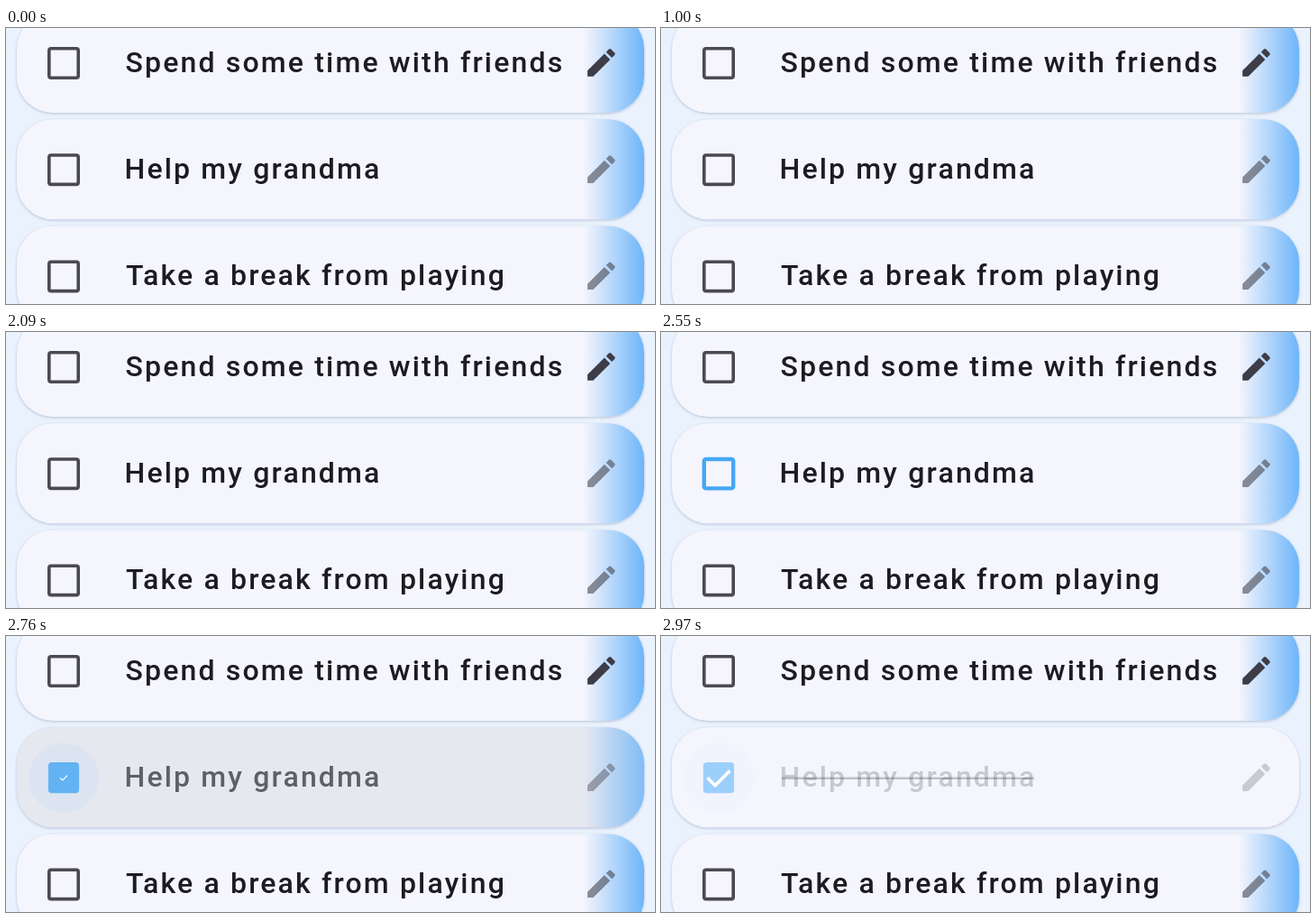
An HTML page that plays this animation: 720x306 px, repeating every 3090 ms.

```html
<!DOCTYPE html>
<html lang="en">
<head>
<meta charset="utf-8">
<title>Task list</title>
<style>
  html, body { margin: 0; width: 100%; height: 100%; overflow: hidden; background: #eaf2fd; }
  svg { display: block; width: 720px; height: 306px; }
  text { font: 500 32px Roboto, Inter, sans-serif; letter-spacing: 2.15px; fill: #1b1b21; }

  .row {
    --card: #f5f5fd; --ink: 1; --pen: .56; --glow: 1; --strike: 0;
    --line: #4a4951; --weight: 3.6; --size: 1;
    --fill: none; --tick: 0; --ripple: 0;
  }
  .strong { --pen: 1; }
  .card { fill: var(--card); filter: drop-shadow(0 1px 1.5px rgba(70, 95, 140, .32)); }
  .glow { fill: url(#blue); opacity: var(--glow); }
  .ink { opacity: var(--ink); }
  .pen { fill: #3c3d47; opacity: var(--pen); }
  .strike { stroke: #1b1b21; stroke-width: 2.6; opacity: var(--strike); }
  .ripple { fill: #42a5f5; opacity: var(--ripple); }
  .box {
    fill: var(--fill); stroke: var(--line); stroke-width: var(--weight);
    transform: scale(var(--size));
  }
  .tick { fill: none; stroke: #fff; stroke-width: 3.7; transform: scale(var(--tick)); }

  /* outline turns blue, fills with a ripple, then the row fades out */
  .done { animation: complete 3090ms step-end infinite; }
  @keyframes complete {
    82.524% { --line: #45a7f5; --weight: 4.4; }
    86.408% { --line: #42a5f5; --fill: #42a5f5; --size: .9; --ripple: .12; }
    89.320% {
      --line: #63b3f2; --fill: #63b3f2; --size: .93; --tick: .32; --ripple: .06;
      --card: #e6e8f0; --ink: .66; --pen: .42; --glow: .85;
    }
    93.204% {
      --line: #8bc7f8; --fill: #8bc7f8; --tick: .9; --ripple: .02;
      --card: #f0f1f9; --ink: .36; --pen: .3; --glow: .25; --strike: .2;
    }
    96.117%, 100% {
      --line: #9dcffb; --fill: #9dcffb; --tick: 1;
      --card: #f5f5fd; --ink: .2; --pen: .23; --glow: 0; --strike: .24;
    }
  }
</style>
</head>
<body>
<svg viewBox="0 0 720 306">
  <defs>
    <linearGradient id="blue" gradientUnits="userSpaceOnUse" x1="641" x2="708" y1="0" y2="0">
      <stop offset="0" stop-color="#6db5f9" stop-opacity="0"/>
      <stop offset=".25" stop-color="#6db5f9" stop-opacity=".24"/>
      <stop offset="1" stop-color="#6db5f9"/>
    </linearGradient>
    <rect id="panel" x="12" y="-17" width="696" height="111" rx="40"/>
    <path id="pencil" transform="translate(640 18) scale(1.7)" d="M3 17.25V21h3.75L17.81 9.94l-3.75-3.75zM20.71 7.04a1 1 0 0 0 0-1.41l-2.34-2.34a1 1 0 0 0-1.41 0l-1.83 1.83 3.75 3.75z"/>
    <rect id="square" x="-16.2" y="-16.2" width="32.4" height="32.4" rx="2.2"/>
  </defs>

  <g class="row strong">
    <use class="card" href="#panel"/>
    <use class="glow" href="#panel"/>
    <g transform="translate(64 39)"><use class="box" href="#square"/></g>
    <text x="132.5" y="49">Spend some time with friends</text>
    <use class="pen" href="#pencil"/>
  </g>

  <g class="row done" transform="translate(0 118.2)">
    <use class="card" href="#panel"/>
    <use class="glow" href="#panel"/>
    <g transform="translate(64 39)">
      <circle class="ripple" r="39"/>
      <use class="box" href="#square"/>
      <path class="tick" d="M-12.5 0L-4 8.5L12.5-8"/>
    </g>
    <text class="ink" x="131.5" y="49">Help my grandma</text>
    <path class="strike" d="M134 39.5H414"/>
    <use class="pen" href="#pencil"/>
  </g>

  <g class="row" transform="translate(0 236.4)">
    <use class="card" href="#panel"/>
    <use class="glow" href="#panel"/>
    <g transform="translate(64 39)"><use class="box" href="#square"/></g>
    <text x="133" y="49">Take a break from playing</text>
    <use class="pen" href="#pencil"/>
  </g>
</svg>
</body>
</html>
```
